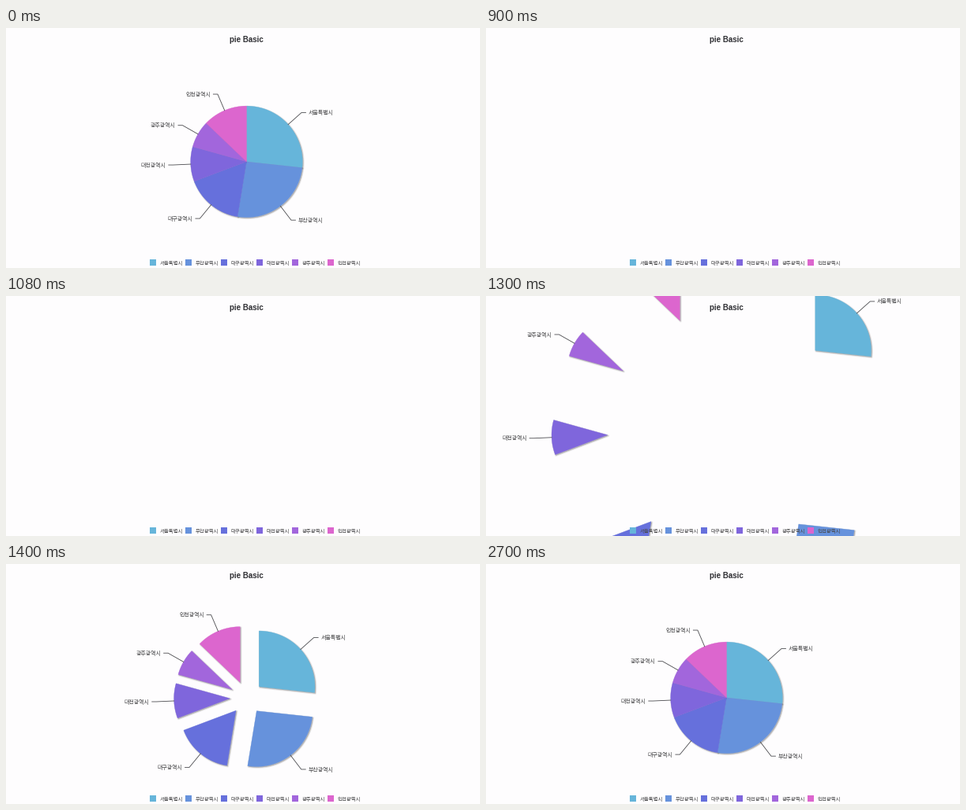
A matplotlib script that plays this animation: 600x305 px, repeating every 3500 ms.

```python
import numpy as np
import matplotlib.pyplot as plt
from matplotlib.animation import FuncAnimation
from matplotlib.patches import Polygon, Rectangle

W, H, DPI = 600, 305, 100
STEP = 100
FRAMES = 35
CENTER = np.array([304.5, 169.9])
RADIUS = 70.8
LEADER = 93.3
HANGUL = "Noto Sans CJK JP"

CITIES = ["서울특별시", "부산광역시", "대구광역시",
          "대전광역시", "광주광역시", "인천광역시"]
COLORS = ["#66b5da", "#6692dc", "#6670dc", "#7f66dc", "#a266dc", "#dc66ce"]
BOUNDS = [0, 96.2, 189.3, 249.3, 285.6, 313.8, 360]  # clockwise from the top


def direction(deg):
    a = np.radians(deg)
    return np.stack([np.sin(a), -np.cos(a)], axis=-1)


def px(size):
    """Pixels to points."""
    return size * 72 / DPI


def spread(t):
    """Distance of every slice from the centre at time t (ms)."""
    if t < 900:
        return 0
    return max(0, 280.5 - 1.297 * (t - 1200))


fig = plt.figure(figsize=(W / DPI, H / DPI), dpi=DPI, facecolor="#fefdfe")
ax = fig.add_axes([0, 0, 1, 1])
ax.set_xlim(0, W)
ax.set_ylim(H, 0)
ax.axis("off")


class Slice:
    def __init__(self, name, color, start, end):
        self.dir = direction((start + end) / 2)
        arc = RADIUS * direction(np.linspace(start, end, 60))
        self.shape = np.vstack([[0, 0], arc])
        self.side = 1 if self.dir[0] > 0 else -1
        self.shadows = [
            ax.add_patch(Polygon(self.shape, fc="black", ec="black", alpha=0.07,
                                 lw=px(w), joinstyle="round", zorder=1))
            for w in (0.2, 1.4, 2.8)]
        self.body = ax.add_patch(
            Polygon(self.shape, fc=color, ec=color, lw=px(0.3), zorder=2))
        self.line, = ax.plot([], [], color="#4c4c50", lw=px(0.85), zorder=3)
        self.label = ax.text(0, 0, name, family=HANGUL, fontsize=px(7),
                             color="#48484a", zorder=4, va="baseline",
                             ha="left" if self.side > 0 else "right")

    def place(self, dist):
        tip = CENTER + dist * self.dir
        self.body.set_xy(self.shape + tip)
        for s in self.shadows:
            s.set_xy(self.shape + tip + [1, 1])
        rim = tip + RADIUS * self.dir
        bend = tip + LEADER * self.dir
        end = bend + [5.5 * self.side, 0]
        self.line.set_data(*np.array([rim, bend, end]).T)
        self.label.set_position((end[0] + 3.2 * self.side, end[1] + 2.6))


slices = [Slice(*args) for args in zip(CITIES, COLORS, BOUNDS, BOUNDS[1:])]

ax.text(304.5, 18, "pie Basic", family="Liberation Sans", weight="bold",
        fontsize=px(9.8), color="#303034", ha="center", va="baseline", zorder=6)

for i, (city, color) in enumerate(zip(CITIES, COLORS)):
    x = 182.4 + 45 * i
    ax.add_patch(Rectangle((x, 294.4), 7.3, 7.3, fc=color, lw=0, zorder=5))
    ax.text(x + 11.9, 301, city, family=HANGUL, fontsize=px(6.4),
            color="#48484a", va="baseline", zorder=6)


def draw(frame):
    dist = spread(frame * STEP)
    for s in slices:
        s.place(dist)
    return []


anim = FuncAnimation(fig, draw, frames=FRAMES, interval=STEP,
                     repeat=True, repeat_delay=0)
plt.show()
```
